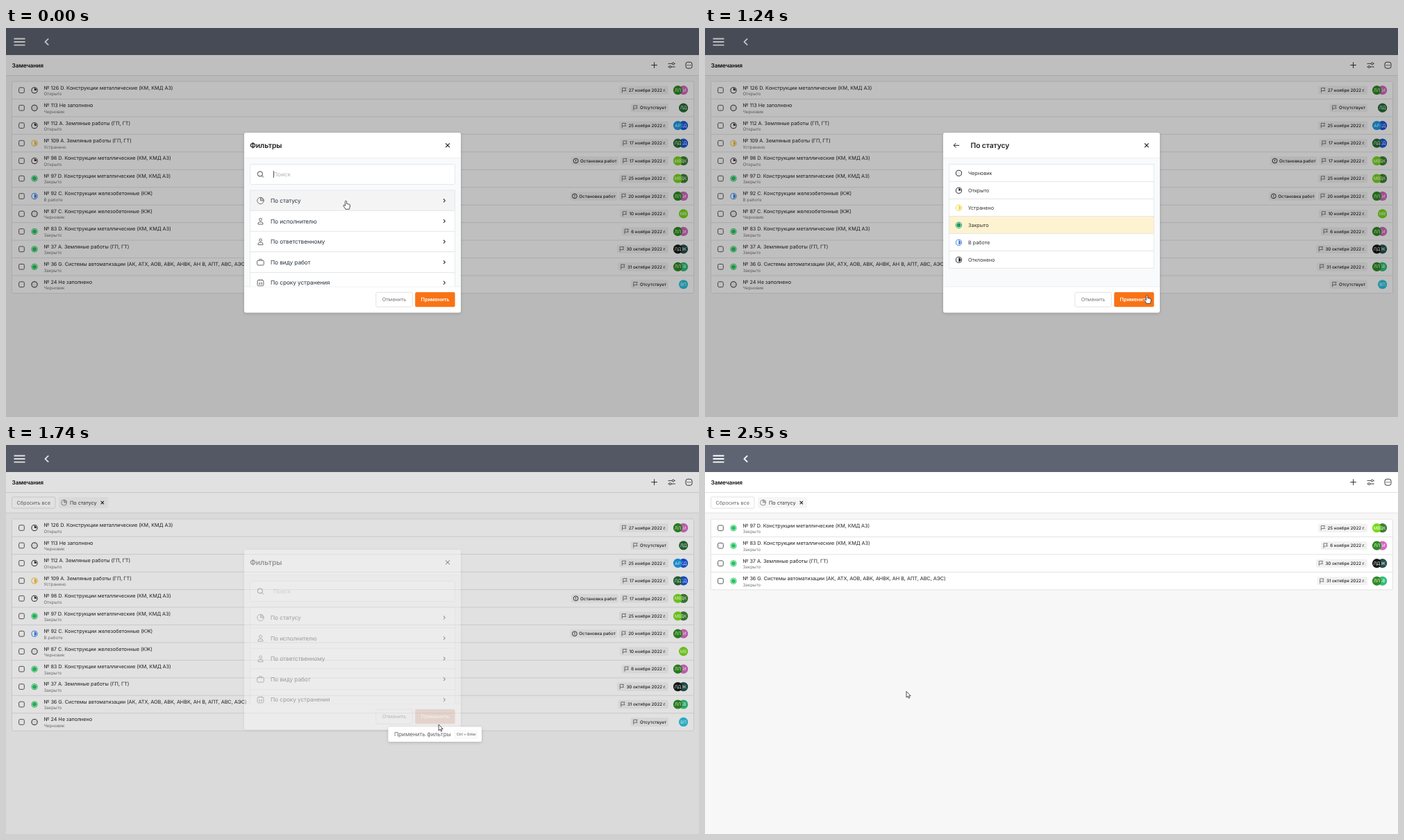
Recreate the animation shown at these times as an HTML page. Size 998 by 561 pixels, loop 2.58 s.

```html
<!DOCTYPE html>
<html lang="ru">
<head>
<meta charset="utf-8">
<title>Замечания</title>
<style>
html, body { margin: 0; width: 100%; height: 100%; overflow: hidden; background: #f7f7f7; }
svg { display: block; font-family: Inter, "Noto Sans", sans-serif; text-rendering: geometricPrecision; }
</style>
</head>
<body>
<svg id="stage" width="998" height="561" viewBox="0 0 998 561"></svg>
<script>
const LOOP = 2580;
const INK = '#222';
const SMALL = 6.24, BASE = 7.28, LARGE = 8.32, HEAD = 10.4;

// Drawing helpers
const tracking = size => size < BASE ? 0 : size < LARGE ? -.006 : -.011;
const text = (x, y, s, size, fill = INK, weight = 400, anchor = 'start') =>
  `<text x="${x}" y="${y}" font-size="${size}" fill="${fill}" font-weight="${weight}" text-anchor="${anchor}" letter-spacing="${tracking(size)}em">${s}</text>`;
const rect = (x, y, w, h, fill, stroke = 'none', r = 0, sw = .8) =>
  `<rect x="${x}" y="${y}" width="${w}" height="${h}" rx="${r}" fill="${fill}" stroke="${stroke}" stroke-width="${sw}"/>`;
const line = (d, stroke = INK, sw = 1, fill = 'none') =>
  `<path d="${d}" stroke="${stroke}" stroke-width="${sw}" fill="${fill}" stroke-linejoin="round"/>`;
const circle = (x, y, r, fill, stroke = 'none', sw = 1) =>
  `<circle cx="${x}" cy="${y}" r="${r}" fill="${fill}" stroke="${stroke}" stroke-width="${sw}"/>`;
const group = (x, y, s, id = '') => `<g ${id && `id="${id}"`} transform="translate(${x} ${y})">${s}</g>`;
const cross = (x, y, r, sw) => line(`M${x - r} ${y - r}l${2 * r} ${2 * r}m0 ${-2 * r}l${-2 * r} ${2 * r}`, INK, sw);

const pen = document.createElement('canvas').getContext('2d');
pen.font = `500 ${SMALL}px Inter, "Noto Sans", sans-serif`;
const widthOf = s => pen.measureText(s).width;

// Status marks
const STATUS = {
  draft: ['Черновик', INK], open: ['Открыто', INK], fixed: ['Устранено', '#f8b62c'],
  closed: ['Закрыто', '#22c55e'], work: ['В работе', '#2f7ff0'], rejected: ['Отклонено', INK]
};
const PALE = { fixed: '#f3d43c', closed: '#1b9a5c', work: '#3f7fd6' };
function mark(x, y, kind, color = STATUS[kind][1]) {
  const inner = {
    draft: '',
    open: line('M0 0V-2.7A2.7 2.7 0 0 1 2.7 0Z', color, .5, color),
    closed: circle(0, 0, 3, color)
  }[kind] ?? line('M0 -2.7A2.7 2.7 0 0 1 0 2.7Z', color, .4, color);
  return group(x, y, circle(0, 0, 4.1, kind === 'draft' ? '#f0f0f0' : '#fff', color, .95) + inner);
}
const pie = (x, y, r, color) => group(x, y, circle(0, 0, r, 'none', color, .9) +
  line(`M0 ${-r}V0H${r}A${r} ${r} 0 0 0 0 ${-r}`, color, .8, '#bbb'));

// Issue list
const METAL = 'D. Конструкции металлические (КМ, КМД АЗ)';
const EARTH = 'А. Земляные работы (ГП, ГТ)';
const CONCRETE = 'С. Конструкции железобетонные (КЖ)';
const SYSTEMS = 'G. Системы автоматизации (АК, АТХ, АОВ, АВК, АНВК, АН В, АПТ, АВС, АЭС)';
const COLORS = {
  ЛЛ: '#2f8a22', ЕИ: '#d567c2', ЛД: '#256b35', АР: '#1a9be8', КД: '#1c55dd', МВ: '#78d81c',
  ДК: '#3c7f35', ЭК: '#25504c', БВ: '#2fbf7a', ВП: '#2cc3dc', ДЛ: '#131a17'
};
const ISSUES = [
  [126, METAL, 'open', '27 ноября 2022 г.', 'ЛЛ ЕИ'],
  [113, 'Не заполнено', 'draft', '', 'ЛД'],
  [112, EARTH, 'open', '25 ноября 2022 г.', 'АР КД'],
  [109, EARTH, 'fixed', '17 ноября 2022 г.', 'ЛД КД'],
  [98, METAL, 'open', '17 ноября 2022 г.', 'МВ ДК', true],
  [97, METAL, 'closed', '25 ноября 2022 г.', 'МВ ДК'],
  [92, CONCRETE, 'work', '20 ноября 2022 г.', 'ЛЛ ЕИ', true],
  [87, CONCRETE, 'draft', '10 ноября 2022 г.', 'МВ'],
  [83, METAL, 'closed', '6 ноября 2022 г.', 'ЛЛ ЕИ'],
  [37, EARTH, 'closed', '30 октября 2022 г.', 'ДЛ ЭК'],
  [36, SYSTEMS, 'closed', '31 октября 2022 г.', 'ЛЛ БВ'],
  [24, 'Не заполнено', 'draft', '', 'ВП']
];
const PITCH = 25.46;

function avatars(names) {
  const list = names.split(' ');
  return list.map((n, i) => {
    const x = list.length > 1 && i === 0 ? 967.5 : 975.6;
    const label = n === 'ДЛ' ? 'ЛД' : n;
    return circle(x, 12.7, 6.6, COLORS[n]) + text(x, 14.9, label, SMALL, '#fff', 400, 'middle');
  }).reverse().join('');
}

function issue([no, title, kind, date, people, stopped], i) {
  const due = date || 'Отсутствует';
  const left = 951 - widthOf(due) - 13.4;
  let s = i ? line('M8.5 0H990.5', '#dcdcdc', .8) : '';
  s += rect(18.6, 8.9, 7.7, 7.7, '#fff', '#444', 1.8, .9) + mark(41, 12.8, kind);
  s += text(54.5, 11.6, `№ ${no} ${title}`, BASE) + text(54.5, 20.2, STATUS[kind][0], SMALL, '#777');
  s += rect(left, 6.5, 954 - left, 12.4, '#f2f2f2', 'none', 2);
  s += group(left + 4.2, 12.7, line('M0 3.6V-3.2H5.4L4.2 -1.2 5.4 .8H0', '#555', .75));
  s += text(951, 15, due, SMALL, INK, 500, 'end');
  if (stopped) {
    const label = 'Остановка работ', end = left - 2.6, x = end - widthOf(label) - 2.4;
    s += rect(x - 13, 6.5, end - x + 13, 12.4, '#f2f2f2', 'none', 2);
    s += circle(x - 6.4, 12.7, 3.4, 'none', INK, .9) + line(`M${x - 6.4} 10.8v2.3m0 .7v.9`, INK, .9);
    s += text(x, 15, label, SMALL, INK, 500);
  }
  return group(0, i * PITCH, s + avatars(people));
}
const issueList = rows =>
  rect(8.5, 0, 982, rows.length * PITCH, '#fff', '#dcdcdc', 2) + rows.map(issue).join('');

// Page
const header = rect(0, 0, 998, 39, '#5f6472') +
  line('M11.5 15.5H27.5M11.5 20H27.5M11.5 24.6H27.5', '#fff', 1.8) +
  line('M61.2 15.4L56.4 20L61.2 24.6', '#fff', 1.8);

const toolbar = rect(0, 39, 998, 29.5, '#fff') + line('M0 68.5H998', '#dedede', .9) +
  text(8.5, 56.8, 'Замечания', LARGE, '#111', 600) +
  line('M929.3 53.6h8.6m-4.3 -4.3v8.6', '#333', 1) +
  line('M953.5 51.4H963.8M953.5 56H963.8', '#333', .9) +
  circle(960.8, 51.4, 1.5, '#fff', '#333', .9) + circle(956.4, 56, 1.5, '#fff', '#333', .9) +
  rect(979, 49.2, 9, 9, 'none', '#333', 2.8, .95) +
  [981.3, 983.5, 985.7].map(x => circle(x, 53.7, .65, '#333')).join('');

const filterBar = rect(0, 69, 998, 29, '#fff') + line('M0 98H998', '#dedede', .9) +
  rect(8.5, 75, 62.5, 16.2, '#fff', '#d8d8d8', 2) + text(39.7, 85.8, 'Сбросить все', BASE, '#666', 400, 'middle') +
  rect(76, 75, 71, 16.2, '#f6f6f6', 'none', 2) + pie(83.6, 83.1, 4, '#888') +
  text(92, 85.8, 'По статусу', BASE, '#333') + cross(138.8, 83.1, 2.2, 1.1);

// Dialog pages
const person = circle(0, -2.4, 1.9, 'none', '#555', .9) +
  line('M-3.5 4.4V3.4Q-3.5 1.2 -1.3 1.2H1.3Q3.5 1.2 3.5 3.4V4.4Z', '#555', .9);
const briefcase = rect(-4.8, -2.6, 9.6, 6.8, 'none', '#555', 1.4, .9) +
  line('M-2 -2.6V-3.4Q-2 -4.4 -1 -4.4H1Q2 -4.4 2 -3.4V-2.6', '#555', .9);
const calendar = rect(-4.4, -3.9, 8.8, 8.3, 'none', '#555', 1.6, .9) + line('M-2 -5v2M2 -5v2', '#555', .9) +
  text(0, 2.5, '23', 4.4, '#444', 600, 'middle');
const FILTERS = [
  ['По статусу', pie(0, 0, 4.7, '#666')], ['По исполнителю', person], ['По ответственному', person],
  ['По виду работ', briefcase], ['По сроку устранения', calendar]
];
const filterRow = ([name, icon], i) => group(0, 234 + i * 29.62,
  `<rect class="option" x="351.5" width="295" height="29.62" fill="#fff" stroke="#e2e4e7" stroke-width=".8"/>` +
  group(366.5, 15, icon) +
  text(381, 17.9, name, LARGE, '#2b3440') + line('M630 12.5l2.4 2.4l-2.4 2.4', '#333', 1.1));

const filterPage = text(351.3, 173.2, 'Фильтры', HEAD, INK, 600) +
  rect(351.5, 196.5, 295, 29, '#fff', '#dfe3e8', 2) +
  circle(365.9, 210.4, 3.6, 'none', '#444', 1) + line('M368.5 213l2.5 2.5', '#444', 1) +
  text(385, 214, 'Поиск', LARGE, '#b4b4b4') + `<g id="caret">${line('M385.4 206V216', '#333', .8)}</g>` +
  `<g clip-path="url(#body)">${FILTERS.map(filterRow).join('')}</g>`;

const statusRow = (kind, i) => group(0, 196.5 + i * 25,
  `<rect class="cell" x="351.5" width="295" height="25" fill="#fff" stroke="#e2e4e7" stroke-width=".8"/>` +
  mark(365.5, 12.8, kind, PALE[kind]) + text(379, 15.4, STATUS[kind][0], BASE, '#333'));
const statusPage = line('M366.2 169.3H358.2M361.4 166L358.2 169.3L361.4 172.6', INK, 1) +
  text(382.5, 173.2, 'По статусу', HEAD, INK, 600) +
  Object.keys(STATUS).map(statusRow).join('');

const dialog = `<g id="dialog"><g filter="url(#shadow)">${rect(343, 151, 312, 259.5, '#fff', 'none', 3)}</g>` +
  rect(343, 188, 312, 185, '#f9fafb') + line('M343 187.7H655M343 373H655', '#e6e8ea', .8) +
  cross(636, 169.3, 2.9, 1.15) +
  `<g id="filterPage">${filterPage}</g><g id="statusPage">${statusPage}</g>` +
  rect(532.8, 381.2, 52.4, 21, '#fff', '#dcdcdc', 2) + text(559, 394.3, 'Отменить', BASE, '#777', 400, 'middle') +
  `<rect id="apply" x="589.2" y="381" width="57.4" height="21.3" rx="2"/>` +
  text(618, 394.3, 'Применить', BASE, '#fff', 600, 'middle') + '</g>';

const tooltip = `<g id="tip"><g filter="url(#shadow)">${rect(550.5, 406.6, 134.5, 21.4, '#fff', 'none', 2)}</g>` +
  rect(645.5, 411, 34.5, 13, '#fafafa', 'none', 2) +
  text(559, 420.3, 'Применить фильтры', LARGE, '#666') + text(649, 419.4, 'Ctrl + Enter', 5.2, '#555') + '</g>';

const HAND = 'M-1.1 1.1a1.1 1.1 0 0 1 2.2 0V4.2l3.6 .7q1.4 .4 1.3 1.8l-.6 3.3q-.2 .7-.5 2H-.6' +
  'q-.5-1.2-1.3-2.1L-3.4 7.4q-.6-1 .2-1.4q.9-.3 2.1 1.3z';
const ARROW = 'M0 0V8.8L2 7L3.4 10L4.8 9.4L3.5 6.5H6.2Z';

const stage = document.getElementById('stage');
stage.innerHTML = `<defs><clipPath id="body"><rect x="343" y="188" width="312" height="184.8"/></clipPath>
  <filter id="shadow" x="-20%" y="-40%" width="140%" height="190%">
  <feDropShadow dx="0" dy="1.2" stdDeviation="2" flood-opacity=".18"/></filter></defs>` +
  rect(0, 0, 998, 561, '#f7f7f7') + header + toolbar + `<g id="filterBar">${filterBar}</g>` +
  group(0, 77, issueList(ISSUES), 'all') +
  group(0, 107, issueList(ISSUES.filter(r => r[2] === 'closed')), 'found') +
  `<rect id="shade" width="998" height="561"/>` + dialog + tooltip +
  `<g id="pointer"><g id="hand">${line(HAND, INK, .8, '#fff')}</g><g id="arrow">${line(ARROW, INK, .8, '#fff')}</g></g>`;

// Motion
const PATH = [
  [0, 489.5, 249.3], [30, 489.5, 249.3], [180, 487.5, 249.3], [350, 487.5, 249.3], [490, 484.5, 280],
  [560, 484.5, 280], [660, 484.5, 271.3], [810, 484.5, 271.3], [900, 515, 296], [1020, 600, 354],
  [1130, 648, 381], [1240, 636.5, 385.3], [1320, 633, 388.5], [1360, 633, 388.5], [1500, 631, 389],
  [1710, 629, 390], [1740, 623.3, 402.8], [1800, 610, 418], [1870, 597, 428], [1980, 579.2, 432.2],
  [2100, 520, 425], [2250, 405, 398], [2350, 340, 377], [2420, 309, 366], [2550, 290, 355.3], [LOOP, 290, 355.3]
];
const SHADE = [[0, .25], [1690, .25], [1740, .12], [1800, .05], [1930, 0], [LOOP, 0]];
const DIALOG = [[0, 1], [1705, 1], [1740, .4], [1830, 0], [LOOP, 0]];
const OPEN = 350, PICK = 520, APPLY = 1390, TIP_ON = 1500, TIP_OFF = 1840, FILTERED = 1915;

function at(track, t, k = 1) {
  const i = Math.max(1, track.findIndex(p => p[0] >= t));
  const a = track[i - 1], b = track[i];
  return a[k] + (b[k] - a[k]) * (t - a[0]) / (b[0] - a[0]);
}

const el = Object.fromEntries([...stage.querySelectorAll('[id]')].map(e => [e.id, e]));
const cells = [...stage.querySelectorAll('.cell')];
const firstOption = stage.querySelector('.option');
const show = (e, on) => e.setAttribute('visibility', on ? 'visible' : 'hidden');

function render(t) {
  const x = at(PATH, t, 1), y = at(PATH, t, 2);
  const picking = t >= OPEN && t < APPLY, applied = t >= APPLY;
  const fade = at(DIALOG, t);

  el.pointer.setAttribute('transform', `translate(${x} ${y})`);
  show(el.hand, !applied);
  show(el.arrow, applied);

  el.dialog.setAttribute('opacity', fade);
  el.dialog.style.display = fade > 0 ? '' : 'none';
  show(el.filterPage, !picking);
  show(el.statusPage, picking);
  show(el.caret, t < 60);
  firstOption.setAttribute('fill', applied ? '#fff' : '#f4f4f4');
  el.apply.setAttribute('fill', applied ? '#eabfad' : '#f97316');

  const over = Math.floor((y - 196.5) / 25);
  cells.forEach((c, i) =>
    c.setAttribute('fill', i === 3 && t >= PICK ? '#fef3d0' : i === over ? '#f4f4f4' : '#fff'));

  show(el.tip, t >= TIP_ON && t < TIP_OFF);
  show(el.filterBar, applied);
  el.all.setAttribute('transform', `translate(0 ${applied ? 106.7 : 77})`);
  show(el.all, t < FILTERED);
  show(el.found, t >= FILTERED);
  el.shade.setAttribute('opacity', at(SHADE, t));
}

const start = performance.now();
function tick() {
  render((performance.now() - start) % LOOP);
  requestAnimationFrame(tick);
}
tick();
</script>
</body>
</html>
```
